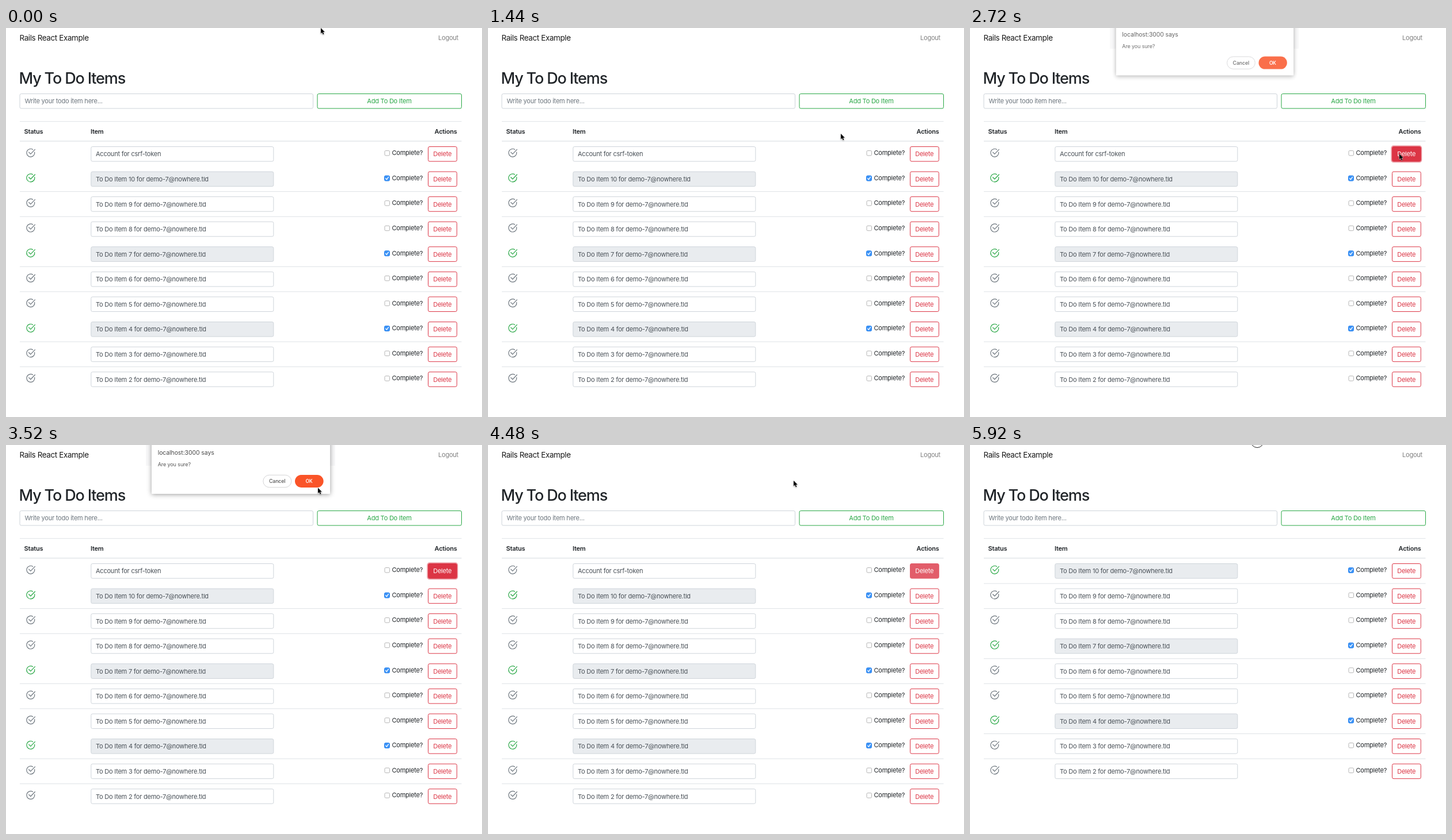
Animation of 827x677 px, one loop 6.08 s. Source, as an HTML page:

```html
<!DOCTYPE html>
<html lang="en">
<head>
<meta charset="utf-8">
<title>To Do Items</title>
<style>
  html, body { margin: 0; width: 100%; height: 100%; overflow: hidden; background: #fff; }
  svg { display: block; }
  text { font: 11px Inter, Roboto, sans-serif; font-optical-sizing: none; letter-spacing: -.22px; fill: #212529; }
  .brand { font-size: 13.4px; letter-spacing: -.36px; fill: #191919; }
  .title { font-size: 27px; font-weight: 500; letter-spacing: -1.15px; }
  .head { font-weight: 600; }
  .muted { fill: #7f7f7f; }
  .hint { fill: #6c757d; }
  .value { fill: #495057; }
  .add { fill: #28a745; }
  .delete { fill: #dc3545; }
  .white { fill: #fff; }
  .middle { text-anchor: middle; }
  .end { text-anchor: end; }
  .host { font-size: 10.4px; letter-spacing: -.05px; fill: #484848; }
  .message { font-size: 9px; letter-spacing: -.1px; fill: #555; }
  .pill { font-size: 8.8px; font-weight: 500; letter-spacing: -.1px; fill: #555; }
  .ok { font-size: 8.4px; font-weight: 600; fill: #fff; }
  .panel { filter: drop-shadow(0 1px 4px rgba(0, 0, 0, .4)); }
  .pointer { filter: drop-shadow(0 1px 1px rgba(0, 0, 0, .35)); }
</style>
</head>
<body>
<svg id="stage" width="827" height="677" viewBox="0 0 827 677"></svg>
<script>
const LOOP = 6080, STEP = 160;
const ROW_TOP = 197, ROW_HEIGHT = 43.57;
const DELETED_AT = 4640;

const items = [
  { label: 'Account for csrf-token', done: false },
  ...[10, 9, 8, 7, 6, 5, 4, 3, 2].map(n => ({
    label: `To Do Item ${n} for demo-7@nowhere.tld`,
    done: n % 3 === 1
  }))
];

// Pointer positions as [start time, x, y]
const pointerStops = [
  [0, 547, 0], [160, 552.5, 2], [800, 553, 15], [960, 581, 149], [1120, 594, 165],
  [1280, 612, 183.5], [1440, 613, 184], [1760, 690, 206], [1920, 738, 217],
  [2080, 746, 219], [3360, 739, 214], [3520, 542, 74.5], [3680, 540, 72],
  [3840, 531, 62], [5600, 509, 8], [5760, 502, 6]
];

const text = (x, y, content, style = '') => `<text x="${x}" y="${y}" class="${style}">${content}</text>`;
const box = (x, y, w, h, fill, stroke, radius = 2.5, extra = '') =>
  `<rect x="${x}" y="${y}" width="${w}" height="${h}" rx="${radius}" fill="${fill}" stroke="${stroke}" ${extra}/>`;
const line = (y, width = 1) => `<path d="M24 ${y}H791.5" stroke="#dee2e6" stroke-width="${width}"/>`;
const stroke = (d, color, width) =>
  `<path d="${d}" fill="none" stroke="${color}" stroke-width="${width}" stroke-linecap="round" stroke-linejoin="round"/>`;

function header() {
  return text(23.5, 22, 'Rails React Example', 'brand')
    + text(786, 21.3, 'Logout', 'muted end')
    + text(22.5, 97, 'My To Do Items', 'title')
    + box(24, 114.5, 509.5, 25.5, '#fff', '#ced4da')
    + text(32.5, 131.4, 'Write your todo item here...', 'hint')
    + box(541, 114.5, 250.5, 25.5, '#fff', '#28a745')
    + text(666, 131.4, 'Add To Do Item', 'add middle')
    + line(162.7)
    + text(31.5, 184.2, 'Status', 'head')
    + text(147, 184.2, 'Item', 'head')
    + text(783.5, 184.2, 'Actions', 'head end')
    + line(196.9, 1.4);
}

function statusIcon(done) {
  const color = done ? '#28a745' : '#6c757d';
  return stroke('M46.6 211.4A7 7 0 1 0 49.7 216', color, 1.2)
    + stroke('M39.6 216.2L42.8 219.4L50.4 211.4', color, 1.2);
}

function checkbox(done) {
  return done
    ? box(657.5, 213.5, 9, 9, '#3b93f7', '#2f86ee', 2) + stroke('M659.7 218.2L661.4 220.2L664.4 215.8', '#fff', 1.3)
    : box(658, 213.5, 8.5, 8.5, '#fff', '#b4b4b4', 1.8);
}

function deleteButton(time, active) {
  const filled = active && time >= 2080;
  const ring = active && time >= 2560 && time < 4320;
  const opacity = active && time >= 4480 ? .8 : 1;
  return (ring ? box(732.4, 205.4, 51.8, 27.8, 'none', '#eda0a8', 3.5, 'stroke-width="2.2"') : '')
    + `<g opacity="${opacity}">`
    + box(733.5, 206.5, 49.8, 25.6, filled ? '#dc3545' : '#fff', '#dc3545')
    + text(758.2, 223.4, 'Delete', `${filled ? 'white' : 'delete'} middle`) + '</g>';
}

function row(item, index, time) {
  const separator = index && !item.done ? line(ROW_TOP + .5) : '';
  return `<g transform="translate(0 ${index * ROW_HEIGHT})">` + separator
    + statusIcon(item.done)
    + box(147.8, 206.5, 317, 25.6, item.done ? '#e9ecef' : '#fff', '#ced4da')
    + text(156, 223.4, item.label, 'value')
    + checkbox(item.done)
    + text(670.5, 221.3, 'Complete?')
    + deleteButton(time, item === items[0]) + '</g>';
}

function dialog(time) {
  if (time < 2720 || time >= 4480) return '';
  const opening = time < 2880, closing = time >= 4320;
  const opacity = opening ? .84 : closing ? .4 : 1;
  const shift = opening || closing ? 'translate(2 -2.4) scale(.995 1)' : '';
  return `<g opacity="${opacity}">`
    + box(243, -5, 328.5, 41, '#f8f8f9', 'none', 0)
    + `<g transform="${shift}">`
    + box(253, -10, 310, 95, '#fff', 'none', 1, 'class="panel"')
    + text(263.7, 17.4, 'localhost:3000 says', 'host')
    + text(263.7, 37.2, 'Are you sure?', 'message')
    + box(446.8, 52.3, 49, 21.4, '#fff', '#d4d4d6', 10.7)
    + text(471.2, 66.1, 'Cancel', 'pill middle')
    + box(502, 52, 49.6, 22, '#fa5428', 'none', 11)
    + text(526.5, 66, 'OK', 'ok middle') + '</g></g>';
}

function pointer(time) {
  if (time >= 5920) return '<circle cx="499" cy="-6.5" r="11" fill="#fff" stroke="#222"/>';
  const [, x, y] = pointerStops.findLast(stop => stop[0] <= time);
  return `<path class="pointer" transform="translate(${x} ${y})" d="M0 0V9.6L2.2 7.6L3.8 11.2L5.4 10.5L3.8 7H6.8Z"
    stroke="#fff" stroke-width=".9" paint-order="stroke"/>`;
}

function scene(time) {
  const visible = time < DELETED_AT ? items : items.slice(1);
  return header() + visible.map((item, i) => row(item, i, time)).join('') + dialog(time) + pointer(time);
}

const stage = document.getElementById('stage');
const start = performance.now();
let shown = -1;

function tick() {
  const elapsed = (performance.now() - start) % LOOP;
  const time = Math.floor(elapsed / STEP) * STEP;
  if (time !== shown) stage.innerHTML = scene(shown = time);
  requestAnimationFrame(tick);
}
tick();
</script>
</body>
</html>
```
